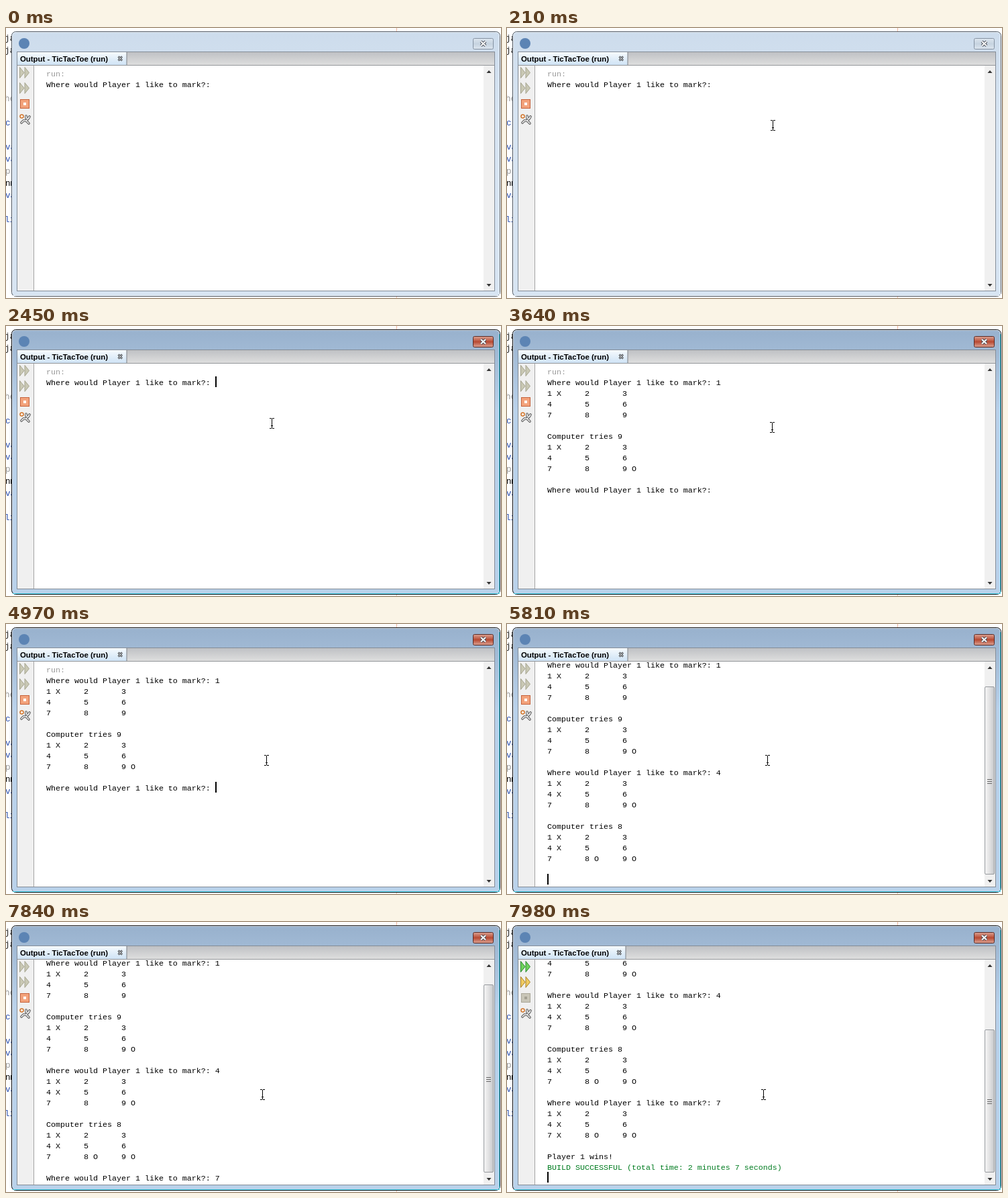
These frames come from a looping animation (738 by 402 pixels, 8 s). An HTML page:

```html
<!DOCTYPE html>
<html lang="en">
<head>
<meta charset="utf-8">
<title>Tic-tac-toe console</title>
<style>
html, body { margin: 0; width: 100%; height: 100%; overflow: hidden; background: #fff; }
#stage { position: relative; width: 738px; height: 402px; overflow: hidden;
  --top: #cddcec; --frame: #d7e4f2; --edge: #4c5560; --glow: #eef4fa;
  --close-top: #dde6ef; --close: #c6d3e0; --close-edge: #8592a2; --cross: #fff;
  --run: #c9c8b4; --run-edge: #a5a48e; --rerun: #c9c8b4; --rerun-edge: #a5a48e;
  --stop: #f3a37c; --stop-edge: #c5623b; --stop-hole: #fff; }
#stage.active { --top: #98b1cd; --frame: #b9d1ea; --edge: #0b0d10; --glow: #4fdcf2;
  --close-top: #dca393; --close: #b84a33; --close-edge: #5a2b26; }
#stage.done { --run: #6fd25c; --run-edge: #278a2b; --rerun: #f0cb62; --rerun-edge: #a67f25;
  --stop: #c9c6b8; --stop-edge: #aaa799; --stop-hole: #a3a093; }
svg { position: absolute; left: 0; top: 0; }
.code { font: 12.5px "Liberation Mono", monospace; }
.tab { font: bold 11.4px "Liberation Sans", Arial, sans-serif; }
#view { position: absolute; left: 42px; top: 56px; width: 670px; height: 334px; overflow: hidden; }
#scroller { position: absolute; left: 18px; top: 0; }
pre { margin: 5px 0 0; font: 11.665px/16px "Liberation Mono", "Courier New", monospace; color: #000; }
pre i { font-style: normal; color: #999; }
pre b { font-weight: normal; color: #007c20; }
#caret { position: absolute; width: 2px; height: 16px; background: #000; }
</style>
</head>
<body>
<div id="stage">
  <svg width="738" height="402">
    <defs>
      <linearGradient id="frameFill" gradientUnits="userSpaceOnUse" x1="0" y1="6" x2="0" y2="126">
        <stop stop-color="var(--top)"/><stop offset="1" stop-color="var(--frame)"/>
      </linearGradient>
      <linearGradient id="closeFill" x2="0" y2="1">
        <stop stop-color="var(--close-top)"/><stop offset=".5" stop-color="var(--close)"/>
        <stop offset="1" stop-color="var(--close-top)"/>
      </linearGradient>
      <linearGradient id="tabFill" x2="0" y2="1">
        <stop stop-color="#f6fafd"/><stop offset="1" stop-color="#cfe3f5"/>
      </linearGradient>
      <linearGradient id="barFill" x2="0" y2="1">
        <stop stop-color="#bfc1c4"/><stop offset="1" stop-color="#dedede"/>
      </linearGradient>
      <linearGradient id="thumbFill">
        <stop stop-color="#f6f6f6"/><stop offset=".5" stop-color="#e2e2e3"/><stop offset="1" stop-color="#c6c7ca"/>
      </linearGradient>
      <path id="arrows" d="M.5 .5l6.5 8-6.5 8zM8 .5l6.5 8-6.5 8z"/>
    </defs>

    <path d="M582.5 0V402" stroke="#f0b49a"/>
    <g class="code" id="editor"></g>

    <rect x="8.5" y="5.5" width="728" height="394" rx="6" fill="url(#frameFill)" stroke="var(--edge)"/>
    <path d="M9.5 394V12q0-5.500 5.500-5.500H730q5.500 0 5.500 5.500" fill="none" stroke="#fff" opacity=".6"/>
    <path d="M10 398.500H735.500V12" fill="none" stroke="var(--glow)"/>
    <circle cx="27" cy="23" r="8" fill="#5c84b4"/>

    <rect x="696.500" y="15.500" width="30" height="16" rx="2" fill="url(#closeFill)" stroke="var(--close-edge)"/>
    <path d="M708 20l7 6.500m0-6.500l-7 6.500" stroke="#4a4f59" stroke-width="4"/>
    <path d="M708 20l7 6.500m0-6.500l-7 6.500" stroke="var(--cross)" stroke-width="2"/>

    <rect x="16.500" y="35.500" width="712" height="356" fill="#fff" stroke="#848d98"/>
    <rect x="17" y="36" width="711" height="19" fill="url(#barFill)"/>
    <rect id="tab" x="17" y="36" height="19" fill="url(#tabFill)"/>
    <path d="M17 55.500H728" stroke="#929599"/>
    <g id="tabEnd">
      <path d="M.5 36V55" stroke="#7c8086"/>
      <path d="M-12 42.500l5.500 6m0-6l-5.500 6" stroke="#33373c" stroke-width="2.600"/>
      <path d="M-12 42.500l5.500 6m0-6l-5.500 6" stroke="#fff"/>
    </g>
    <text class="tab" x="21" y="50">Output - TicTacToe (run)</text>

    <rect x="17" y="56" width="24" height="335" fill="#f0f0f0"/>
    <path d="M41.500 56V391" stroke="#a4a4a4"/>
    <use href="#arrows" x="20" y="58" fill="var(--run)" stroke="var(--run-edge)"/>
    <use href="#arrows" x="20" y="81" fill="var(--rerun)" stroke="var(--rerun-edge)"/>
    <rect x="21.500" y="106.500" width="13" height="13" fill="var(--stop)" stroke="var(--stop-edge)"/>
    <rect x="26" y="111" width="4" height="4" fill="var(--stop-hole)"/>
    <g fill="none" stroke-linecap="round">
      <path d="M23 141l3-3h4l4-4M30 138l4 4M30 131v3l3 1 2-3" stroke="#555" stroke-width="3.600"/>
      <path d="M23 141l3-3h4l4-4M30 138l4 4M30 131v3l3 1 2-3" stroke="#f4f4f4" stroke-width="1.600"/>
      <circle cx="23.500" cy="131.500" r="2.500" fill="#fff" stroke="#d0752c" stroke-width="1.500"/>
    </g>

    <rect x="712" y="56" width="16" height="335" fill="#f0f0f0"/>
    <path d="M716.500 67l3.500-4 3.500 4zM716.500 381l3.500 4 3.500-4z" fill="#333"/>
    <g id="bar">
      <rect id="thumb" x="712.500" width="14" rx="1.500" fill="url(#thumbFill)" stroke="#979a9e"/>
      <path id="grip" d="M716 -2.500h7m-7 3h7m-7 3h7" stroke="#666"/>
    </g>
  </svg>

  <div id="view"><div id="scroller"><pre id="output"></pre><div id="caret"></div></div></div>

  <svg width="738" height="402">
    <path id="mouse" d="M-3 -7.500H0M1 -7.500H4M.5 -7V7M-3 7.500H0M1 7.500H4M-1 3.500H2" fill="none" stroke="#000"/>
  </svg>
</div>

<script>
const LOOP = 8000, LINE = 16, CHAR = 7, TICK = 70;
const $ = id => document.getElementById(id);

// Slivers of the editor behind the window: baseline, text, colour, x
const blue = '#2a4fb0', grey = '#999';
$('editor').innerHTML = [
  [19, 'ja', '#222', -2], [37, 'ja', '#222', -2], [109, 'he', grey, -2], [145, 'c.', blue, -1],
  [181, 'va', blue, -1], [199, 'va', blue, -1], [217, 'pr', grey, -1], [235, 'nm', '#000', -1],
  [253, 'va', blue, -1], [289, 'li', blue, -2], [307, '.', blue, 5], [325, '.', grey, 5]
].map(([y, text, fill, x]) => `<text x="${x}" y="${y}" fill="${fill}">${text}</text>`).join('');

const ask = 'Where would Player 1 like to mark?: ';
const board = marks => [1, 4, 7].map(first => [0, 1, 2].map(i => {
  const cell = first + i;
  return (cell + (marks[cell] ? ' ' + marks[cell] : '')).padEnd(8);
}).join('').trimEnd()).join('\n') + '\n\n';

const marks = {};
const play = (cell, mark) => { marks[cell] = mark; return board(marks); };
const turn = (mine, reply) => '\n' + play(mine, 'X') + `Computer tries ${reply}\n` + play(reply, 'O');

// Console output, appended at the given times
const chunks = [
  [0, 'run:\n' + ask],
  [2590, '1'], [2940, turn(1, 9)], [3150, ask],
  [5460, '4'], [5810, turn(4, 8)], [6020, ask],
  [7420, '7'],
  [7980, '\n' + play(7, 'X') + 'Player 1 wins!\nBUILD SUCCESSFUL (total time: 2 minutes 7 seconds)\n']
];

const caretToggles = [700, 1120, 1610, 2030, 2450, 2730, 2940, 3640, 4060, 4480,
  4970, 5390, 5460, 5600, 5810, 6510, 6930, 7840, 7980];

// Time, x, y
const mousePath = [[70, 548, 338], [210, 396, 145], [3570, 396, 145], [3640, 395, 151],
  [3850, 388, 203], [6300, 388, 203], [6650, 382, 257], [LOOP, 382, 257]];

function mouseAt(time) {
  const next = Math.max(1, mousePath.findIndex(point => point[0] > time));
  const [t0, x0, y0] = mousePath[next - 1], [t1, x1, y1] = mousePath[next];
  const k = (time - t0) / (t1 - t0);
  return [x0 + (x1 - x0) * k, y0 + (y1 - y0) * k].map(Math.round);
}

let shown = '';
function showOutput(text) {
  if (text === shown) return;
  shown = text;
  $('output').innerHTML = text.replace(/^run:/, '<i>$&</i>').replace(/BUILD.*/, '<b>$&</b>');
  const lines = text.split('\n'), row = lines.length - 1;
  const scroll = Math.max(0, row * LINE - 313);
  $('scroller').style.top = -scroll + 'px';
  $('caret').style.left = lines[row].length * CHAR + 'px';
  $('caret').style.top = 3 + row * LINE + 'px';

  const height = Math.round(298.5 * 331 / (331 + scroll));
  $('bar').style.display = scroll ? '' : 'none';
  $('thumb').setAttribute('y', 372.5 - height);
  $('thumb').setAttribute('height', height);
  $('grip').setAttribute('transform', `translate(0 ${Math.round(373 - height / 2)})`);
}

function draw(now) {
  const time = now % LOOP, done = time >= 7980;
  $('stage').classList.toggle('active', time >= 700);
  $('stage').classList.toggle('done', done);
  showOutput(chunks.filter(([start]) => start <= time).map(chunk => chunk[1]).join(''));
  $('caret').hidden = caretToggles.filter(start => start <= time).length % 2 === 0;

  const tabEnd = done ? 177 : 180;
  $('tab').setAttribute('width', tabEnd - 17);
  $('tabEnd').setAttribute('transform', `translate(${tabEnd - 0.5} 0)`);

  $('mouse').style.display = time < TICK ? 'none' : '';
  if (time >= TICK) {
    $('mouse').setAttribute('transform', `translate(${mouseAt(Math.floor(time / TICK) * TICK)})`);
  }
  requestAnimationFrame(() => draw(performance.now() - begin));
}
const begin = performance.now();
draw(0);
</script>
</body>
</html>
```
